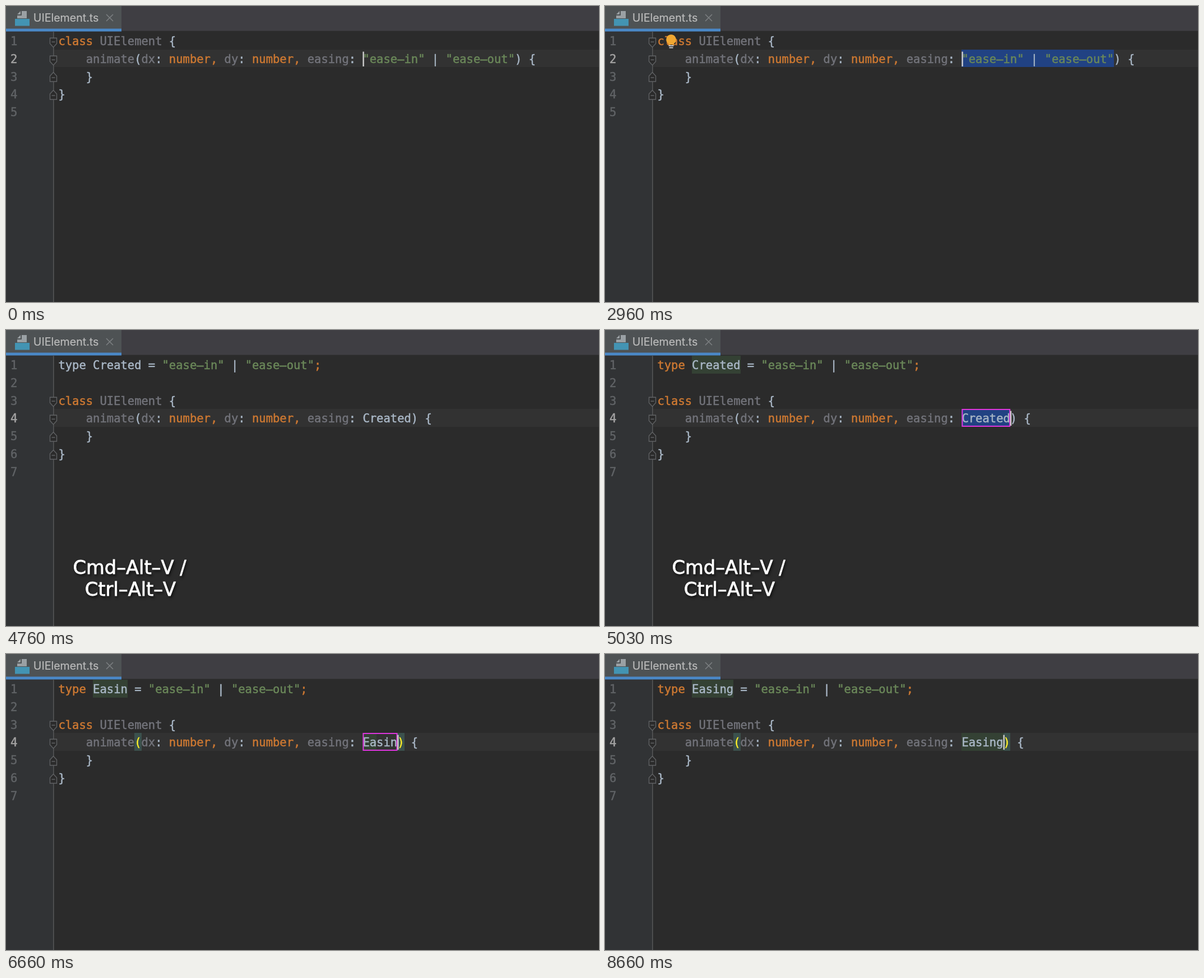
Animation of 1058x529 px, one loop 9.46 s. Source, as an HTML page:

```html
<!DOCTYPE html>
<html lang="en">
<head>
<meta charset="utf-8">
<title>Extract a type alias</title>
<style>
  html, body { margin: 0; width: 100%; height: 100%; overflow: hidden; background: #2b2b2b; }
  svg { display: block; width: 100vw; height: 100vh; }
  text { white-space: pre; }
  .code { font: 20.5px "DejaVu Sans Mono", "Liberation Mono", monospace; stroke-width: .5; }
  .tab { font: 19.6px Inter, Roboto, sans-serif; fill: #bbbbbb; stroke: #bbbbbb; stroke-width: .2; }
  .keys { font: 33.7px "DejaVu Sans", "Open Sans", sans-serif; fill: #fff; text-anchor: middle;
          stroke: #fff; stroke-width: .8; filter: drop-shadow(2px 3px 2px rgba(0, 0, 0, .6)); }
</style>
</head>
<body>
<svg viewBox="0 0 1058 529" xmlns="http://www.w3.org/2000/svg">
  <rect width="1058" height="529" fill="#2b2b2b"/>
  <rect y="45" width="84" height="484" fill="#313335"/>
  <rect width="1058" height="44" fill="#3f3e43"/>
  <rect y="44" width="1058" height="1" fill="#353537"/>
  <rect width="206" height="41" fill="#4e5254"/>
  <rect y="40.5" width="206" height="5" fill="#4a88c7"/>
  <path d="M28 9H37V22H20V17H28Z M26 9V15H20Z" fill="#9aa0a4"/>
  <rect x="16" y="23" width="26" height="12.5" fill="#4394b3"/>
  <text class="tab" x="48.8" y="28">UIElement.ts</text>
  <path d="M179 15L191 27M191 15L179 27" stroke="#7b7f81" stroke-width="1.6"/>
  <g id="editor"></g>
  <path d="M84.8 45.5V529" stroke="#555657" stroke-width="1.6"/>
  <g id="folds" fill="#2b2b2b" stroke="#606264" stroke-width="1.4"></g>
  <g id="bulb">
    <path d="M118 51a9 9 0 0 1 5 16.3V69H113V67.3A9 9 0 0 1 118 51Z" fill="#f0a732"/>
    <path d="M113.5 71H122.5M114.5 74.5H121.5" stroke="#c9cbcd" stroke-width="2"/>
  </g>
  <g id="keys" class="keys">
    <text x="220.5" y="436">Cmd–Alt–V /</text>
    <text x="222" y="475">Ctrl–Alt–V</text>
  </g>
</svg>
<script>
const LOOP = 9460;
const CHAR = 12.342, LEFT = 93.4, TOP = 45.9, LINE = 31.75;
const TYPE_COL = 44;
const COLOR = {
  plain: '#a9b7c6', keyword: '#cc7832', string: '#6a8759', unused: '#72737a',
  select: '#214283', usage: '#344134', bracketBack: '#3b514d', bracket: '#ffef28',
  template: '#dd35dd', caret: '#cfcfcf'
};
const UNION = '"ease–in" | "ease–out"';
const TOKENS = /"[^"]*"|\w+|[^\s\w"]/g;

// [start time, alias name]
const NAMES = [[4760, 'Created'], [5960, 'E'], [6230, 'Ea'], [6360, 'Eas'],
               [6530, 'Easi'], [6660, 'Easin'], [6760, 'Easing']];
const CARET_OFF = [[430, 930], [2460, 2960], [3460, 3960], [4460, 4800], [8000, 8500]];

const el = id => document.getElementById(id);
const colX = col => LEFT + CHAR * col;
const rowY = row => Math.round(TOP + LINE * row);
const baseline = row => TOP + LINE * row + 24.3;

function band(row, x, right, fill) {
  const y = rowY(row);
  return `<rect x="${x}" y="${y}" width="${right - x}" height="${rowY(row + 1) - y}" fill="${fill}"/>`;
}

const back = (row, col, count, fill) =>
  band(row, Math.round(colX(col)), Math.round(colX(col + count)), fill);

const glyphs = (x, row, color, text) =>
  `<text class="code" x="${x}" y="${baseline(row)}" fill="${color}" stroke="${color}">${text}</text>`;

function tokenColor(token, { typeLit, brackets }) {
  if (token[0] === '"') return COLOR.string;
  if (token === 'type') return typeLit ? COLOR.keyword : COLOR.plain;
  if (/^(class|number|[,;])$/.test(token)) return COLOR.keyword;
  if (/^(UIElement|animate|dx|dy|easing)$/.test(token)) return COLOR.unused;
  if (brackets && /^[()]$/.test(token)) return COLOR.bracket;
  return COLOR.plain;
}

const codeLine = (line, row, state) => [...line.matchAll(TOKENS)]
  .map(m => glyphs(colX(m.index), row, tokenColor(m[0], state), m[0])).join('');

function foldMark(row, closing) {
  const y = rowY(row) + (closing ? 18 : 19.3), s = closing ? -1 : 1;
  return `<path d="M78.5 ${y - 8 * s}H90.5V${y + 2 * s}L84.5 ${y + 8.5 * s}L78.5 ${y + 2 * s}Z
    M81.5 ${y - s}H87.5"/>`;
}

function stateAt(t) {
  const within = (from, to) => t >= from && t < to;
  const name = (NAMES.filter(([start]) => t >= start).pop() || [0, ''])[1];
  return {
    name,
    selected: name ? 0 : t >= 1330 ? UNION.length : t >= 1160 ? 9 : 0,
    typeLit: t >= 5030,
    nameSelected: within(4800, 5960),
    template: within(4800, 8660),
    brackets: t >= 6030,
    usage: t >= 6960 ? 6 : t >= 6330 ? 2 : 0,
    caret: !CARET_OFF.some(([from, to]) => within(from, to)),
    bulb: within(360, 1160) || within(2000, 4760),
    keys: within(4500, 6200)
  };
}

function editor(state) {
  const { name } = state, size = name.length;
  const active = name ? 3 : 1, end = TYPE_COL + size;
  const lines = [
    ...(name ? [`type ${name} = ${UNION};`, ''] : []),
    'class UIElement {',
    `    animate(dx: number, dy: number, easing: ${name || UNION}) {`,
    '    }', '}', ''
  ];
  let out = band(active, 85, 1058, '#323232');

  if (state.selected) out += back(active, TYPE_COL, state.selected, COLOR.select);
  if (state.typeLit) out += back(0, 5, size, COLOR.usage);
  if (state.usage) out += back(active, TYPE_COL, state.usage, COLOR.usage);
  if (state.nameSelected) out += back(active, TYPE_COL, size, COLOR.select);
  if (state.brackets) out += back(active, 11, 1, COLOR.bracketBack) + back(active, end, 1, COLOR.bracketBack);

  lines.forEach((line, row) => {
    out += glyphs(8, row, row === active ? '#a4a3a3' : '#606366', row + 1) + codeLine(line, row, state);
  });

  if (state.template) {
    out += `<rect x="${colX(TYPE_COL) + 1}" y="${rowY(active) + 1}" width="${CHAR * size - 1.6}"
      height="30" fill="none" stroke="${COLOR.template}" stroke-width="2"/>`;
  }
  if (state.caret) {
    out += `<rect x="${colX(end)}" y="${rowY(active) + 3.6}" width="2.4" height="26.4" fill="${COLOR.caret}"/>`;
  }
  return out;
}

let shown = '';
function draw(t) {
  const state = stateAt(t), key = JSON.stringify(state);
  if (key === shown) return;
  shown = key;
  const first = state.name ? 2 : 0;
  el('editor').innerHTML = editor(state);
  el('folds').innerHTML = [0, 1, 2, 3].map(i => foldMark(first + i, i > 1)).join('');
  el('bulb').style.display = state.bulb ? '' : 'none';
  el('keys').style.display = state.keys ? '' : 'none';
}

const start = performance.now();
function tick() {
  draw((performance.now() - start) % LOOP);
  requestAnimationFrame(tick);
}
tick();
</script>
</body>
</html>
```
